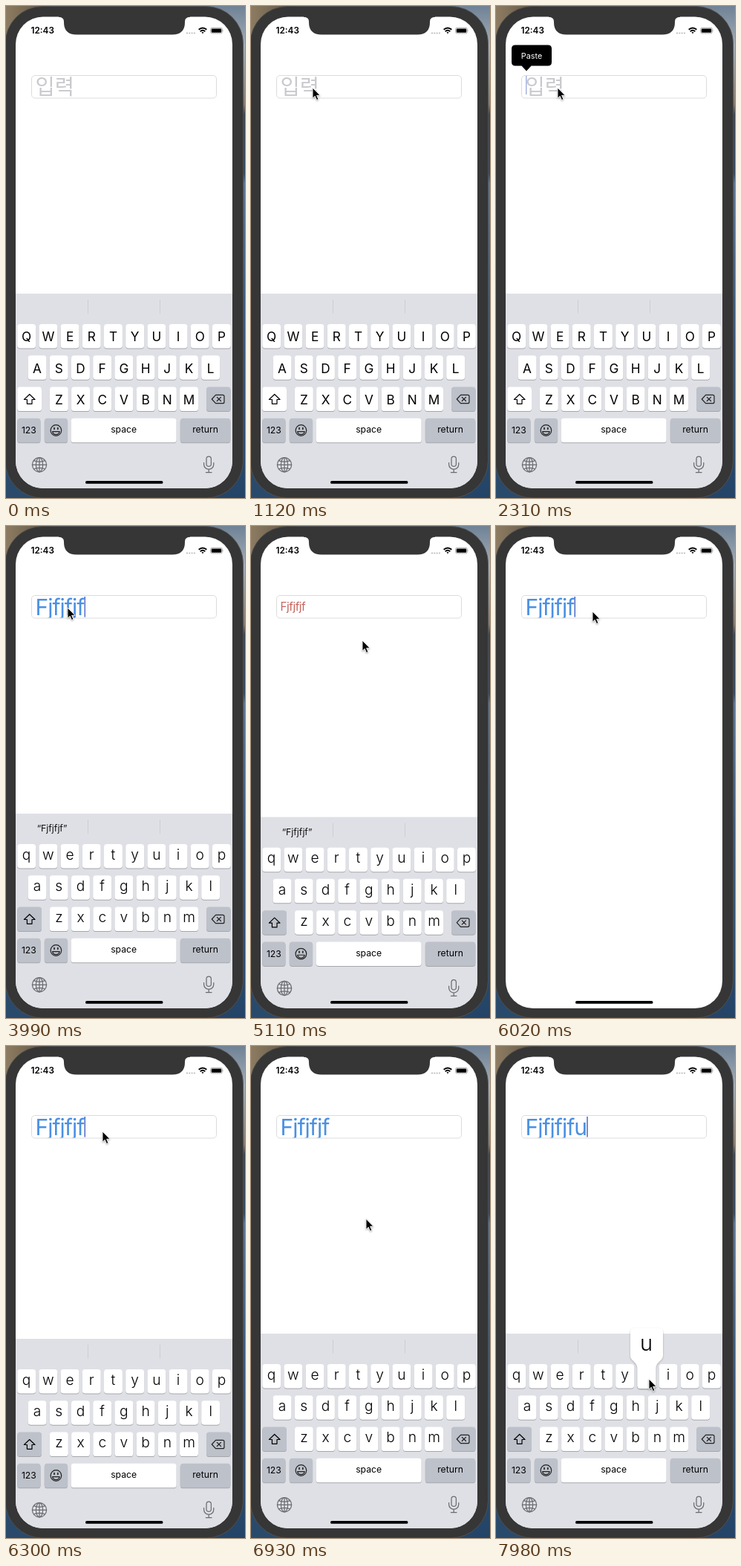
Animation, 322 px wide and 662 px high, one loop 8 s. Source, as an HTML page:

```html
<!DOCTYPE html>
<html lang="ko">
<head>
<meta charset="utf-8">
<title>Text field</title>
<style>
html, body { margin: 0; width: 100%; height: 100%; overflow: hidden; background: #3a3a3a; }
svg { display: block; width: 322px; height: 662px; font-family: Inter, "Noto Sans", sans-serif; }
.mid { text-anchor: middle; }
.line { fill: none; stroke-linecap: round; stroke-linejoin: round; }
</style>
</head>
<body>
<svg viewBox="0 0 322 662">
  <defs>
    <linearGradient id="shore" x1="0" y1="0" x2="0" y2="1">
      <stop offset="0" stop-color="#6f8296"/>
      <stop offset=".08" stop-color="#a3adb5"/>
      <stop offset=".2" stop-color="#85796b"/>
      <stop offset=".22" stop-color="#3c4550"/>
      <stop offset=".34" stop-color="#33475f"/>
      <stop offset=".36" stop-color="#5a7390"/>
      <stop offset=".6" stop-color="#3b5a7c"/>
      <stop offset="1" stop-color="#234467"/>
    </linearGradient>
    <linearGradient id="rock" x1="0" y1="0" x2="1" y2="0">
      <stop offset="0" stop-color="#8d7c62"/>
      <stop offset="1" stop-color="#5d5342"/>
    </linearGradient>
    <clipPath id="screen"><rect x="13" y="14.5" width="292" height="634.5" rx="37"/></clipPath>
    <clipPath id="inner"><rect x="35" y="94" width="248" height="29.5"/></clipPath>
    <filter id="soft" x="-30%" y="-30%" width="160%" height="160%">
      <feDropShadow dx="0" dy="1" stdDeviation="1.3" flood-opacity=".28"/>
    </filter>
  </defs>

  <rect width="322" height="662" fill="url(#shore)"/>
  <rect width="60" height="60" fill="url(#rock)"/>
  <rect y="600" width="60" height="62" fill="#2a4a6b"/>
  <rect x="-1" y=".5" width="320.5" height="661.5" rx="50" fill="#363636" stroke="#555" stroke-width=".8"/>

  <g clip-path="url(#screen)">
    <rect x="13" y="14" width="292" height="636" fill="#fff"/>
    <rect x="34.5" y="93.5" width="249" height="30.5" rx="4.5" fill="#fff" stroke="#dcdcdc"/>
    <g clip-path="url(#inner)">
      <text id="hint" x="39.5" y="119" font-size="28.5" font-weight="300" fill="#c9c9ce"
        font-family="'Noto Sans CJK KR','Noto Sans CJK',sans-serif">입력</text>
      <text id="value" x="39.5"></text>
    </g>
    <rect id="caret" y="95" width="1.5" height="27" fill="#4a69c8"/>

    <g id="board">
      <rect x="13" y="387" width="292" height="264" fill="#dfe0e5"/>
      <path d="M110.5 395v18.5M207.5 395v18.5" stroke="#cdced3"/>
      <text id="guess" class="mid" x="62" y="411" font-size="12.3" fill="#111"></text>
      <g id="keys"></g>
      <path id="shift" class="line" d="M31.7 522.5l7.3 7h-4v5.8h-6.6v-5.8h-4z" stroke="#000" stroke-width="1.2"/>
      <g class="line" stroke="#222" stroke-width="1.2">
        <path d="M282.5 523.3h9.5q2 0 2 2v7.4q0 2-2 2h-9.5l-5.2-5.7zM284.3 526.3l5.2 5.2m0-5.2l-5.2 5.2"/>
        <circle cx="67.4" cy="571" r="7.3"/>
        <path d="M62.6 572.6h9.6q-.8 4-4.8 4t-4.8-4z"/>
        <path d="M65 567.7v1.6M69.8 567.7v1.6" stroke-width="1.7"/>
      </g>
      <g class="line" stroke="#6a6c72" stroke-width="1.25">
        <circle cx="45" cy="617.3" r="9.6"/>
        <ellipse cx="45" cy="617.3" rx="4.6" ry="9.6"/>
        <path d="M45 607.7v19.2M35.4 617.3h19.2M37.4 611.6q7.6 3.4 15.2 0M37.4 623q7.6-3.4 15.2 0"/>
        <rect x="270" y="606" width="6.4" height="13.4" rx="3.2"/>
        <path d="M266.6 614.5v2.3a6.6 6.6 0 0 0 13.2 0v-2.3M273.2 623.5v4.2M269.4 627.7h7.6"/>
      </g>
      <g id="pop">
        <path filter="url(#soft)" fill="#fff" d="M187 379.5h32q6 0 6 6v30q0 5-4.5 8.5t-5.3 9v24q0 4-4 4h-16.6q-4 0-4-4v-24q-.8-5.500-5.300-9t-4.300-8.500v-30q0-6 6-6z"/>
        <text class="mid" x="202.500" y="410" font-size="29" font-weight="300">u</text>
      </g>
    </g>

    <g id="paste">
      <path d="M26 52.500h44q5 0 5 5v18q0 5-5 5h-22.500l-6.500 7-6.500-7h-8.500q-5 0-5-5v-18q0-5 5-5z"/>
      <text class="mid" x="48" y="70.500" font-size="10.800" fill="#fff">Paste</text>
    </g>
    <rect x="107" y="639" width="104.500" height="3.800" rx="1.900"/>
  </g>

  <path d="M71 14h177v.8q-7 .2-7 6.200v1q0 16.500-17 16.500h-129q-17 0-17-16.500v-1q0-6-7-6.200z" fill="#363636"/>
  <text x="33.500" y="37" font-size="11.800" font-weight="600">12:43</text>
  <path d="M243 36.500h12" stroke="#b5b5b5" stroke-width="1.600" stroke-dasharray="2 1.300"/>
  <g fill="none" stroke="#000" stroke-width="1.900">
    <path d="M259.700 31.800q5.300-4.600 10.600 0M261.700 34.200q3.300-2.700 6.600 0"/>
    <path d="M265 37.300l-1.600-1.700q1.600-1.100 3.200 0z" fill="#000" stroke="none"/>
  </g>
  <rect x="275.500" y="29.300" width="16" height="7.600" rx="2.200" fill="none" stroke="#999" stroke-width=".8"/>
  <rect x="276.700" y="30.500" width="13.600" height="5.200" rx="1.200"/>
  <path d="M292.600 31.700q1.300 1.400 0 2.800z" fill="#999"/>

  <path id="mouse" d="M0 0v14.200l3.200-3 2.300 5.300 2.400-1-2.300-5.200h4.500z" stroke="#fff" stroke-width=".9"
    style="filter:drop-shadow(0 1px 1px #0005)"/>
</svg>
<script>
const LOOP = 8000, STEP = 70;
const BLUR = 5100, FOCUS = 6025;
const $ = id => document.getElementById(id);

function add(parent, tag, attrs, text) {
  const el = document.createElementNS('http://www.w3.org/2000/svg', tag);
  for (const k in attrs) el.setAttribute(k, attrs[k]);
  if (text) el.textContent = text;
  parent.append(el);
  return el;
}

function key(x, y, w, fill = '#fff') {
  add($('keys'), 'rect', { x, y: y + 1, width: w, height: 32.5, rx: 3.9, fill: '#a5a7ac' });
  return add($('keys'), 'rect', { x, y, width: w, height: 32.5, rx: 3.9, fill });
}

const GREY = '#bdc1ca';
const letters = [];
[['QWERTYUIOP', 15.2, 428], ['ASDFGHJKL', 29.6, 470.2], ['ZXCVBNM', 58.9, 512.6]].forEach(([row, x0, y]) => {
  [...row].forEach((char, i) => {
    const x = x0 + i * 29.2;
    key(x, y, 24.9);
    letters.push({ char, y, el: add($('keys'), 'text', { x: x + 12.45, class: 'mid' }) });
  });
});
const shiftKey = key(15.2, 512.6, 32.8);
key(270, 512.6, 32.5, GREY);
[['123', 15.2, 31.3, GREY], ['', 51.8, 31.3, GREY], ['space', 87.6, 142, '#fff'], ['return', 234.8, 67.5, GREY]]
  .forEach(([label, x, w, fill]) => {
    key(x, 554.8, w, fill);
    add($('keys'), 'text', { x: x + w / 2, y: label === '123' ? 575.3 : 574.3, class: 'mid', 'font-size': 12.2 }, label);
  });

let caps = null;
function setCaps(on) {
  if (on === caps) return;
  caps = on;
  for (const { char, y, el } of letters) {
    el.textContent = on ? char : char.toLowerCase();
    el.setAttribute('y', y + (on ? 23.3 : 20.8));
    el.setAttribute('font-size', on ? 17.2 : 19.2);
    el.setAttribute('font-weight', on ? 400 : 300);
  }
  shiftKey.setAttribute('fill', on ? '#fff' : GREY);
  $('shift').setAttribute('fill', on ? '#000' : 'none');
}

const strokes = [...'Fjfjfjf'].map((c, i) => [2870 + i * 115, c]).concat([[7980, 'u']]);
const typed = t => strokes.filter(s => s[0] <= t).map(s => s[1]).join('');

const clamp = v => Math.min(1, Math.max(0, v));
const ease = v => v * v * (3 - 2 * v);

const path = [
  [0, 345, 330], [490, 83, 110], [4250, 83, 110], [4760, 150, 154], [5390, 150, 154],
  [5800, 130, 115], [6650, 130, 115], [7350, 201, 449], [7420, 201, 449], [7560, 206, 448], [8000, 206, 448]
];
function mouseAt(t) {
  const i = path.findIndex(p => p[0] > t);
  const [a, b] = [path[i - 1], path[i]];
  const k = ease((t - a[0]) / (b[0] - a[0]));
  return [a[1] + (b[1] - a[1]) * k, a[2] + (b[2] - a[2]) * k];
}

// critically damped spring: 1 at the start, 0 at rest
const spring = ms => ms <= 0 ? 1 : (1 + ms * .02) * Math.exp(-ms * .02);
function drop(t) {
  if (t < BLUR) return 0;
  return 264 * (t < FOCUS ? 1 - spring(t - BLUR) : spring(t - FOCUS));
}

function blink(t) {
  if (t >= BLUR && t < 6020) return 0;
  const last = strokes.filter(s => s[0] <= t).pop();
  const start = Math.max(70, last ? last[0] - 70 : 0, t >= 6020 ? 6020 : 0);
  const u = t - start, p = u % 1120;
  if (u < 0) return 0;
  if (p < 70) return u < 1120 ? 1 : .5;
  return clamp(1 - (p - 490) / 280);
}

function render(t) {
  const text = typed(t), idle = t >= BLUR && t < 6020;
  const value = $('value');
  $('hint').style.display = text ? 'none' : '';
  value.textContent = text;
  value.setAttribute('y', idle ? 114.3 : 119.8);
  value.setAttribute('font-size', idle ? 15.2 : 30);
  value.setAttribute('letter-spacing', idle ? -.45 : -1);
  value.setAttribute('fill', idle ? '#c4655f' : '#4a90e2');

  const w = text ? value.getComputedTextLength() : 0;
  $('caret').setAttribute('x', text ? 39.5 + w + .2 : 40);
  $('caret').setAttribute('y', text ? 95 : 94);
  $('caret').setAttribute('height', text ? 27.5 : 25);
  $('caret').setAttribute('opacity', blink(t));

  const guess = t < FOCUS - 300 ? typed(t - 70) : '';
  $('guess').textContent = guess && `“${guess}”`;
  setCaps(!text);
  $('board').setAttribute('transform', `translate(0 ${drop(t).toFixed(2)})`);
  $('pop').style.display = t >= 7910 ? '' : 'none';
  $('paste').setAttribute('opacity', clamp((t - 1400) / 210) * clamp(1 - (t - 2800) / 210));
  $('mouse').setAttribute('transform', `translate(${mouseAt(t).map(v => v.toFixed(2))})`);
}

const begin = performance.now();
function tick() {
  const t = Math.max(0, performance.now() - begin) % LOOP;
  render(Math.floor(t / STEP) * STEP);
  requestAnimationFrame(tick);
}
tick();
</script>
</body>
</html>
```
